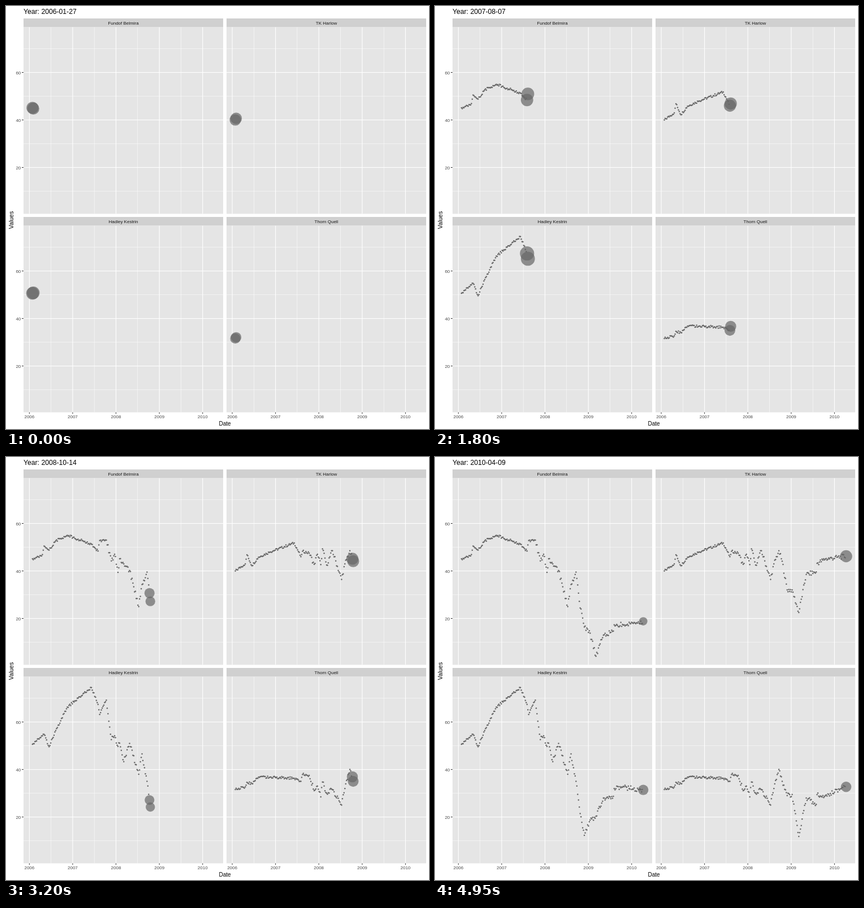
Write an HTML page with a canvas that moves like this. It is 748x748 px and loops after 5000 ms.

```html
<!DOCTYPE html>
<html lang="en">
<head>
<meta charset="utf-8">
<title>Weekly values</title>
<style>
  html, body { margin: 0; width: 100%; height: 100%; overflow: hidden; background: #fff; }
  canvas { display: block; }
</style>
</head>
<body>
<canvas id="stage" width="748" height="748"></canvas>
<script>
const ctx = document.getElementById('stage').getContext('2d');
const FRAMES = 100, FRAME_MS = 50, DAYS = 1533, WEEKS = 219;
const START = Date.UTC(2006, 0, 27), DAY_MS = 864e5;
const PX_PER_DAY = 0.2097, PX_PER_UNIT = 4.2;
const PANEL_W = 353, STRIP_H = 15.5, PANEL_H = 345.5;

// Weeks at which all four series turn; values between them are interpolated.
const turns = [0, 12, 14, 20, 28, 42, 71, 79, 81, 89, 95, 99, 103, 105, 110, 117,
  128, 132, 138, 142, 148, 154, 162, 171, 183, 184, 194, 219];

const noise = i => {
  const s = Math.sin(i * 12.9898) * 43758.5453;
  return s - Math.floor(s) - 0.5;
};

function series(values) {
  const points = [];
  let k = 0;
  for (let week = 0; week <= WEEKS; week++) {
    if (week > turns[k + 1]) k++;
    const part = (week - turns[k]) / (turns[k + 1] - turns[k]);
    const jitter = part % 1 ? noise(week + values[0]) * (week < 90 ? 1 : 2) : 0;
    const value = values[k] + (values[k + 1] - values[k]) * part + jitter;
    // The week before the last one closes a day early.
    const day = week * 7 - (week === WEEKS - 1 ? 1 : 0);
    points.push({ day, value, frame: Math.round(day / DAYS * (FRAMES - 1)) });
  }
  return points;
}

const panel = (name, x, y, values) => ({ name, x, y, points: series(values) });

const panels = [
  panel('Fundof Belmira', 31, 22, [45.1, 46.9, 50.5, 48.8, 52.7, 55, 51.3, 48.4, 52.8, 53,
    44.2, 47, 39.4, 45.1, 43, 40.2, 25, 34.3, 39.5, 27.2, 16.4, 14.8, 4.1, 13, 14.7, 17.3,
    17.5, 18.8]),
  panel('TK Harlow', 390, 22, [40, 43, 46.8, 42.2, 45.8, 48, 51.8, 46, 48.3, 47.5,
    42.8, 47, 42.7, 49.3, 42.5, 48.5, 36.4, 43, 48.5, 44.1, 32, 32, 22.5, 38.5, 39.6, 43.2,
    45, 46.2]),
  panel('Hadley Kestrin', 31, 373, [50.6, 54.2, 54.8, 49.6, 56.4, 66.3, 74.5, 67.4, 63.2, 69.2,
    52.6, 54.2, 49.7, 51.1, 43.3, 51, 38, 46.6, 35, 24.2, 12.3, 18, 20.3, 28, 28.7, 32,
    32.5, 31.4]),
  panel('Thorn Quell', 390, 373, [31.6, 32.7, 34.6, 34, 36.8, 36.8, 36.3, 35, 37.9, 37.5,
    31.1, 33, 28.5, 34.7, 30, 31.5, 25, 32, 40, 35, 29, 29.5, 11.8, 28, 25.3, 29.4,
    29, 32.7])
];

const dayX = (p, day) => p.x + (p.x > 31 ? 15.5 : 15.8) + day * PX_PER_DAY;
const valueY = (p, value) => p.y + (p.y > 22 ? 347.6 : 347.5) - value * PX_PER_UNIT;
const yearX = (p, year) => dayX(p, (Date.UTC(year, 0, 1) - START) / DAY_MS);
const radius = value => 2.5 + 10.7 * Math.sqrt(Math.max(0, value - 4) / 71.6);

function rect(color, x, y, w, h) {
  ctx.fillStyle = color;
  ctx.fillRect(x, y, w, h);
}

function text(str, x, y, size, color, align = 'center') {
  ctx.font = `${size}px "Liberation Sans", Arial, sans-serif`;
  ctx.textAlign = align;
  ctx.fillStyle = color;
  ctx.fillText(str, x, y);
}

function dot(x, y, r, color) {
  ctx.fillStyle = color;
  ctx.beginPath();
  ctx.arc(x, y, r, 0, Math.PI * 2);
  ctx.fill();
}

function drawPanel(p) {
  const top = p.y + STRIP_H, bottom = p.y + PANEL_H;
  const vLine = (x, w) => rect('#fff', x - w / 2, top, w, bottom - top);
  const hLine = (y, w) => rect('#fff', p.x, y - w / 2, PANEL_W, w);
  rect('#d0d0d0', p.x, p.y, PANEL_W, STRIP_H);
  rect('#e5e5e5', p.x, top, PANEL_W, bottom - top);
  text(p.name, p.x + PANEL_W / 2, p.y + 11, 8, '#1a1a1a');

  for (let v = 10; v <= 70; v += 20) hLine(valueY(p, v), 0.53);
  for (let y = 2006; y < 2010; y++) vLine((yearX(p, y) + yearX(p, y + 1)) / 2, 0.53);
  for (let v = 20; v <= 60; v += 20) {
    const y = valueY(p, v);
    hLine(y, 1.07);
    if (p.x > 31) continue;
    rect('#333', 28, y - 0.5, 3, 1);
    text(v, 26.3, y + 3, 8, '#4d4d4d', 'right');
  }
  for (let year = 2006; year <= 2010; year++) {
    const x = yearX(p, year);
    vLine(x, 1.07);
    if (p.y === 22) continue;
    rect('#333', x - 0.5, bottom, 1, 2.7);
    text(year, x, 729.3, 8, '#4d4d4d');
  }
}

function drawPoints(p, frame) {
  for (const { day, value, frame: shown } of p.points) {
    if (shown > frame) break;
    const x = dayX(p, day), y = valueY(p, value);
    if (shown < frame) dot(x, y, 1.25, '#666');
    else dot(x, y, radius(value), 'rgba(102,102,102,0.7)');
  }
}

function draw(frame) {
  rect('#fff', 0, 0, 748, 748);
  const date = new Date(START + Math.floor(DAYS * frame / (FRAMES - 1)) * DAY_MS);
  text('Year: ' + date.toISOString().slice(0, 10), 31, 14, 12.2, '#000', 'left');
  text('Date', 387, 741.5, 10, '#000');
  ctx.save();
  ctx.translate(12.5, 378.5);
  ctx.rotate(-Math.PI / 2);
  text('Values', 0, 0, 10.5, '#000');
  ctx.restore();
  for (const p of panels) {
    drawPanel(p);
    drawPoints(p, frame);
  }
}

const begin = performance.now();
let last = -1;
function tick() {
  const frame = Math.floor((performance.now() - begin) / FRAME_MS) % FRAMES;
  if (frame !== last) draw(last = frame);
  requestAnimationFrame(tick);
}
tick();
</script>
</body>
</html>
```
